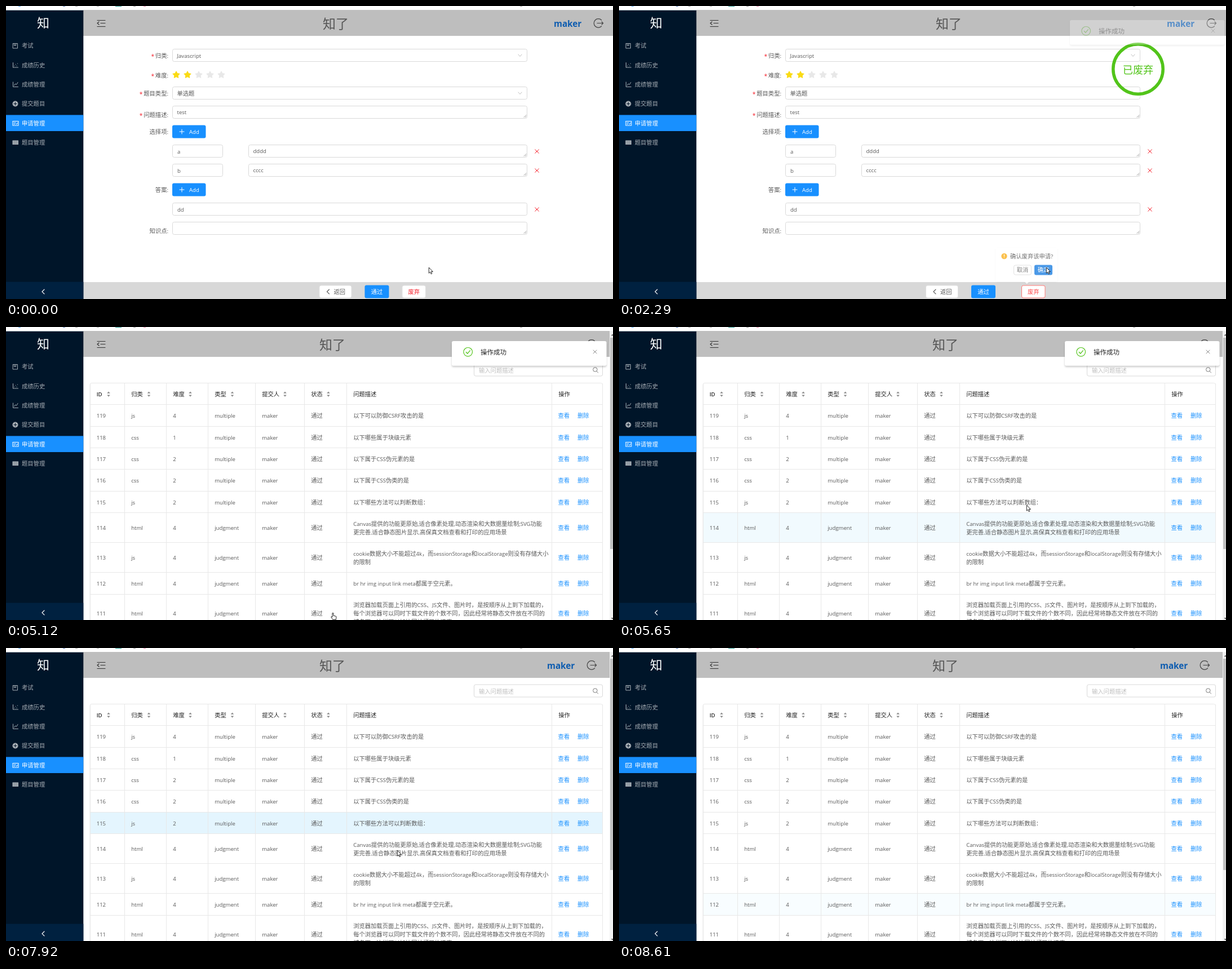
These frames come from a looping animation (1077 by 520 pixels, 9450 ms). An HTML page:

```html
<!DOCTYPE html>
<html lang="zh-CN">
<head>
<meta charset="utf-8">
<title>申请管理</title>
<style>
html, body { margin: 0; width: 100%; height: 100%; overflow: hidden; background: #fff; }
svg { display: block; width: 100%; height: 100%; }
text { font-family: "Open Sans", "Noto Sans CJK SC", "Noto Sans CJK", sans-serif; font-weight: 300; white-space: pre; }
.l { font-size: .93em; font-weight: 400; }
.strong .l { font-weight: 600; }
.line { fill: none; stroke-linecap: round; stroke-linejoin: round; }
</style>
</head>
<body>
<svg id="stage" viewBox="0 0 1077 520" xmlns="http://www.w3.org/2000/svg"></svg>
<script>
const BLUE = '#1890ff', RED = '#f5222d', GREEN = '#52c41a', INK = '#595959', EDGE = '#d9d9d9';
const LOOP = 9450;

// ---- drawing helpers ----
const latin = s => s.replace(/[\x20-\x7e]+/g, m => `<tspan class="l">${m}</tspan>`);
const text = (x, cy, s, fill = INK, size = 10.3, extra = '') =>
  `<text x="${x}" y="${cy + size * .36}" font-size="${size}" fill="${fill}" ${extra}>${latin(s)}</text>`;
const mid = 'text-anchor="middle"';
const rect = (x, y, w, h, fill, extra = '') =>
  `<rect x="${x}" y="${y}" width="${w}" height="${h}" fill="${fill}" ${extra}/>`;
const box = (x, y, w, h, stroke = EDGE, fill = '#fff', r = 3) =>
  rect(x + .5, y + .5, w - 1, h - 1, fill, `stroke="${stroke}" rx="${r}"`);
const line = (d, stroke, w = 1) => `<path class="line" d="${d}" stroke="${stroke}" stroke-width="${w}"/>`;
const circle = (x, y, r, fill, extra = '') => `<circle cx="${x}" cy="${y}" r="${r}" fill="${fill}" ${extra}/>`;
const group = (id, body) => `<g id="${id}">${body}</g>`;
const cross = (x, y, r, c) => line(`M${x - r} ${y - r}l${2 * r} ${2 * r}m0 ${-2 * r}l${-2 * r} ${2 * r}`, c);
const left = (x, y, c) => line(`M${x + 2} ${y - 4}l-4 4l4 4`, c, 1.1);

function star(x, y, c) {
  let pts = '';
  for (let i = 0; i < 10; i++) {
    const a = i * Math.PI / 5 - Math.PI / 2, r = i % 2 ? 3.2 : 6.2;
    pts += `${(x + r * Math.cos(a)).toFixed(2)},${(y + r * Math.sin(a)).toFixed(2)} `;
  }
  return `<polygon points="${pts}" fill="${c}" stroke="${c}" stroke-width="1.2" stroke-linejoin="round"/>`;
}

// ---- page frame ----
function sidebar() {
  const dim = '#a6adb4';
  const icons = [
    c => line('M12.5 66.5h8v8.5h-8zM14.5 66.5v4l1.5-1l1.5 1v-4', c),
    c => line('M12.5 100.5v8.5h9M15 106v.2M17 103.5v.2M19 106v.2M20.5 102v.2', c, 1.1),
    c => line('M12.5 135v8.5h9M14.5 141l2-3l2 1.5l2.5-4', c),
    c => circle(16.5, 173.5, 5, c) + line('M14 173.5h5M16.5 171v5', '#001529'),
    c => rect(12, 204.5, 10, 7.5, 'none', `stroke="${c}"`) + line('M14 207h3M14 209.5h2M18 209l1 1l2-3', c),
    c => rect(11.5, 238.5, 10.5, 7.5, c) + line('M13.5 240.5h7M13.5 242.3h7M13.5 244.2h7', '#68727c', .5)
  ];
  const names = ['考试', '成绩历史', '成绩管理', '提交题目', '申请管理', '题目管理'];
  return rect(0, 7.6, 137.3, 512.4, '#001529') + rect(0, 489.6, 137.3, 30.4, '#002140') +
    rect(0, 193.4, 137.3, 28.6, BLUE) + text(66, 30.5, '知', '#fff', 22, mid) + left(66, 507, '#fff') +
    names.map((n, i) => {
      const c = i === 4 ? '#fff' : dim;
      return icons[i](c) + text(28, 70.7 + i * 34.3, n, c);
    }).join('');
}

const strip = () => rect(0, 0, 1077, 7, '#fff') +
  [[24, BLUE], [103, '#2a5db0'], [125, '#888'], [163, '#999'], [228, '#777'], [246, '#e75a8c'], [914, '#888']]
    .map(([x, c]) => rect(x - 2, 0, 4, 1, c, 'opacity=".7"')).join('') + rect(194, 0, 11, 1, '#2aa198');

const header = () => rect(137, 7, 940, 46, '#bebebe') +
  line('M162 25.5h14M168 30.5h8M162 36.5h14M165 28l-3 2.5l3 2.5', '#333', 1.2) +
  group('title', text(585, 32, '知了', '#555', 23, mid)) +
  group('user', `<text x="972" y="37" font-size="15.2" fill="#0d5cb0" style="font-weight:700">maker</text>` +
    line('M1056.5 25a7.8 7.8 0 1 0 0 11M1049 30.5h10.5M1057 28l2.5 2.5l-2.5 2.5', '#444', 1.2));

// ---- form page ----
function form() {
  const label = (y, s, must) => {
    const w = s.length * 10.3 + 3;
    return text(288, y, s + ':', INK, 10.3, 'text-anchor="end"') +
      (must ? text(281 - w, y + 1, '*', RED, 11) : '');
  };
  const grip = y => line(`M919 ${y}l4-4M921.5 ${y}l1.5-1.5`, '#888', .8);
  const area = (x, y, s) => box(x, y, 925 - x, 23) + text(x + 8.5, y + 11, s) + grip(y + 20.5);
  const select = (y, s) => box(295, y, 630, 23) + text(303.5, y + 12, s) +
    line(`M909 ${y + 10}l3 3.5l3-3.5`, '#bfbfbf');
  const add = y => rect(295, y, 59.5, 23, BLUE, 'rx="3"') +
    line(`M308 ${y + 11.5}h8M312 ${y + 7.5}v8`, '#fff') + text(325, y + 12, 'Add', '#fff');
  const option = (y, k, v) => box(295, y, 90, 23) + text(304, y + 12, k) + area(430, y, v) + cross(942, y + 12, 3.3, RED);
  const back = (edge, ink) => box(555.5, 495.5, 58, 23, edge) + left(571.5, 507, ink) + text(581.5, 507, '返回', ink);
  const drop = (edge, ink, fill) => box(702.5, 495.5, 42.5, 23, edge, fill) + text(723.7, 507, '废弃', ink, 10.3, mid);
  return rect(137, 53, 940, 437, '#fff') + rect(137, 490, 940, 30, '#d8d8d8') +
    label(88, '归类', 1) + select(76, 'Javascript') +
    label(123, '难度', 1) + [0, 1, 2, 3, 4].map(i => star(302 + i * 20, 122.3, i < 2 ? '#fadb14' : '#e8e8e8')).join('') +
    label(155, '题目类型', 1) + select(143, '单选题') +
    label(193, '问题描述', 1) + area(295, 177, 'test') +
    label(223.5, '选择项') + add(211.5) +
    option(246, 'a', 'dddd') + option(280, 'b', 'cccc') +
    label(326, '答案') + add(314.5) +
    box(295, 349, 630, 23) + text(304, 361, 'dd') + cross(942, 361, 3.3, RED) +
    label(399, '知识点') + area(295, 383, '') +
    group('stamp', circle(921, 112, 44.2, 'none', `stroke="${GREEN}" stroke-width="5.5"`) +
      text(921, 113.5, '已废弃', GREEN, 18.2, mid)) +
    group('okBtns', group('back', back('#e0e0e0', INK)) + group('backOn', back('#40a9ff', '#40a9ff')) +
      rect(636.5, 495.5, 43, 23, BLUE, 'rx="3"') + text(658, 507, '通过', '#fff', 10.3, mid)) +
    group('dropBtn', group('drop', drop('#e0e0e0', RED)) + group('dropOn', drop('#ff7875', '#ff4d4f')) +
      group('dropOff', drop(EDGE, '#b8b8b8', '#f5f5f5'))) +
    group('pop', `<path d="M671 429h104q3 0 3 3v54q0 3-3 3h-47l-4.3 4.3l-4.3-4.3h-48.4q-3 0-3-3v-54q0-3 3-3z" fill="#fff" filter="url(#soft)"/>` +
      circle(683.5, 444, 5.2, '#faad14') + line('M683.5 441v3.5M683.5 446.6v.1', '#fff', 1.1) +
      text(694, 444, '确认废弃该申请?', '#444') +
      box(700, 459.5, 32, 18) + text(716, 468.7, '取消', INK, 10.3, mid) +
      rect(737, 459.5, 32, 18, '#1078e0', 'rx="3"') + text(753, 468.7, '确定', '#fff', 10.3, mid));
}

// ---- table page ----
const cols = [149, 210.5, 284.5, 358.5, 442.5, 529.5, 604.5, 968.5, 1058.5];
const edges = [137.5, 176.5, 214.5, 252.5, 291.5, 329.5, 382.5, 435.5, 474.5, 542.5];
const rows = [
  ['js', 4, '以下可以防御CSRF攻击的是'],
  ['css', 1, '以下哪些属于块级元素'],
  ['css', 2, '以下属于CSS伪元素的是'],
  ['css', 2, '以下属于CSS伪类的是'],
  ['js', 2, '以下哪些方法可以判断数组：'],
  ['html', 4, 'Canvas提供的功能更原始,适合像素处理,动态渲染和大数据量绘制;SVG功能|更完善,适合静态图片显示,高保真文档查看和打印的应用场景'],
  ['js', 4, 'cookie数据大小不能超过4k，而sessionStorage和localStorage则没有存储大小|的限制'],
  ['html', 4, 'br hr img input link meta都属于空元素。'],
  ['html', 4, '浏览器加载页面上引用的CSS、JS文件、图片时，是按顺序从上到下加载的，|每个浏览器可以同时下载文件的个数不同，因此经常将静态文件放在不同的|域名下，这样可以加快网站打开的速度']
];

function table() {
  const heads = ['ID', '归类', '难度', '类型', '提交人', '状态', '问题描述', '操作'];
  const sorts = [182, 253.5, 327, 401.5, 495, 572];
  const cell = (i, y, s, c, extra) => text(cols[i] + 11.7, y, String(s), c, 10.3, extra);
  let out = rect(137, 53, 940, 467, '#fff') + box(830, 64.5, 229, 23) + text(839, 77, '输入问题描述', '#bfbfbf') +
    circle(1045.3, 75.5, 3.7, 'none', 'stroke="#777"') + line('M1048 78.5l2.5 2.5', '#777') +
    rect(149, 99.5, 909.5, 450, '#fff', 'stroke="#e8e8e8" rx="3"');
  out += rows.map((r, i) => rect(149, edges[i], 909, edges[i + 1] - edges[i], '#e4f5fe', `id="row${i}" opacity="0"`)).join('');
  out += line(cols.slice(1, -1).map(x => `M${x} 99.5V520`).join('') + edges.map(y => `M149 ${y}H1058.5`).join('') +
    'M149.5 101V520M1058.5 101V520', '#e8e8e8');
  out += heads.map((h, i) => cell(i, 118.8, h, '#262626', 'class="strong"')).join('');
  out += sorts.map(x => `<path d="M${x - 2.8} 117.8l2.8-3.3l2.8 3.3zM${x - 2.8} 120.5l2.8 3.3l2.8-3.3z" fill="#8c8c8c"/>`).join('');
  rows.forEach(([kind, level, words], i) => {
    const y = i === 8 ? 508.5 : (edges[i] + edges[i + 1]) / 2 + .3;
    const type = i < 5 ? 'multiple' : 'judgment';
    [119 - i, kind, level, type, 'maker', '通过'].forEach((s, k) => { out += cell(k, y, s); });
    const parts = words.split('|');
    parts.forEach((s, k) => { out += cell(6, y + (k - (parts.length - 1) / 2) * 15, s); });
    out += text(979.5, y, '查看', BLUE) + text(1014, y, '删除', BLUE);
  });
  return out + rect(1071, 7, 6, 513, '#f1f1f1') + rect(1072, 19, 5, 375, '#c1c1c1') +
    '<path d="M1073.5 15.5l2.5-3l2.5 3zM1073.5 516l2.5 3l2.5-3z" fill="#666"/>';
}

const notice = () => rect(791, 25, 274.5, 43.5, '#fff', 'rx="3" filter="url(#shade)"') +
  circle(819.7, 44.3, 7.8, 'none', `stroke="${GREEN}" stroke-width="1.2"`) +
  line('M816.3 44.5l2.6 2.7l4.4-5.4', GREEN, 1.3) +
  text(842, 45, '操作成功', '#262626', 11.5) + cross(1045, 44, 3, '#8c8c8c');

const pointer = () =>
  group('arrow', '<path d="M.3 0v10.2l2.3-2.1l1.6 3.6l1.7-.8l-1.6-3.4h3.1z" fill="#fff" stroke="#111" stroke-width=".9" stroke-linejoin="round"/>') +
  group('hand', '<path d="M-1 1q1-1.5 2 0v4.3l4 .9q1.2.4 1 1.8l-.7 4.5h-5.3l-3-4.3q-.4-1.5 1-1.2l1 1z" fill="#fff" stroke="#111" stroke-width=".9" stroke-linejoin="round"/>');

const stage = document.getElementById('stage');
stage.innerHTML = `<defs>
  <filter id="soft" x="-20%" y="-20%" width="140%" height="150%"><feDropShadow dx="0" dy="1" stdDeviation="1.5" flood-opacity=".05"/></filter>
  <filter id="shade" x="-10%" y="-30%" width="120%" height="180%"><feDropShadow dx="0" dy="2.5" stdDeviation="1.5" flood-opacity=".2"/></filter>
</defs>` + rect(0, 0, 1077, 520, '#fff') + header() + group('form', form()) + group('table', table()) +
  sidebar() + strip() + group('notice', notice()) + group('cursor', pointer());

// ---- timing ----
const runs = [[0, 0, 1], [150, 540, 4], [810, 1610, 7], [2290, 3290, 8], [3420, 3840, 4], [5120, 5650, 5],
  [5800, 6160, 3], [6310, 7250, 8], [7400, 7920, 5], [8050, 8340, 3], [8490, 8610, 2]];
const ticks = runs.flatMap(([a, b, n]) => Array.from({ length: n }, (_, i) => n > 1 ? Math.round(a + (b - a) * i / (n - 1)) : a));
const snap = t => ticks.filter(k => k <= t).pop() || 0;

const path = [[0, 750, 464], [20, 750, 464], [540, 723, 505], [1000, 723, 505], [1610, 758, 464], [2300, 758, 464],
  [3290, 612, 510], [3840, 580, 507], [5250, 580, 507], [5517, 700, 350], [5650, 723, 316], [6310, 711, 297],
  [6900, 613, 303], [7250, 660, 306], [7790, 692, 324], [7920, 694, 359], [8340, 690, 472], [8490, 688, 560], [LOOP, 688, 560]];

function place(t) {
  const i = Math.max(1, path.findIndex(p => p[0] >= t));
  const [t0, x0, y0] = path[i - 1], [t1, x1, y1] = path[i];
  const f = (t - t0) / (t1 - t0);
  return [x0 + (x1 - x0) * f, y0 + (y1 - y0) * f];
}

// Share of the last 200 ms the pointer spent over a row, eased.
function glow(i, t) {
  let n = 0;
  for (let s = 5; s < 200; s += 10) {
    if (t - s < 5500) break;
    const y = place(snap(t - s))[1];
    if (y >= edges[i] && y < edges[i + 1]) n++;
  }
  return (n / 20) ** 1.5;
}

const el = id => document.getElementById(id);
const fade = (id, o) => {
  el(id).setAttribute('opacity', o);
  el(id).style.display = +o ? '' : 'none';
};
const move = (id, x, y = 0) => el(id).setAttribute('transform', `translate(${x} ${y})`);
const within = (t, a, b) => t >= a && t < b;

let last = -1;
function show(t) {
  const q = snap(t), list = q >= 5120;
  if (q === last) return;
  last = q;
  fade('form', list ? 0 : 1);
  fade('table', list ? 1 : 0);
  move('title', list ? -6 : 0);
  move('user', list ? -12 : 0);

  const shift = q >= 810 ? 11.5 : 0;
  move('okBtns', -shift);
  move('dropBtn', shift);
  fade('backOn', q >= 3690 ? 1 : 0);
  fade('dropOn', within(q, 540, 2400) ? 1 : 0);
  fade('dropOff', q >= 2400 ? 1 : 0);
  fade('stamp', q >= 2290 ? 1 : 0);

  const open = within(q, 810, 2290) ? Math.min(1, (q - 700) / 200) : within(q, 2290, 2400) ? .75 : 0;
  const k = q < 2290 ? .8 + .2 * open : 1;
  fade('pop', open);
  el('pop').setAttribute('transform', `translate(723.7 493) scale(${k}) translate(-723.7 -493)`);

  fade('notice', within(q, 2290, 2400) ? .3 : within(q, 2400, 6840) ? 1 : within(q, 6840, 6950) ? .4 : 0);
  move('notice', within(q, 2290, 2400) ? 9 : 0);

  const hand = within(q, 410, 1000) || within(q, 1470, 2290) || within(q, 3560, 5200);
  fade('hand', hand ? 1 : 0);
  fade('arrow', hand ? 0 : 1);
  move('cursor', ...place(q));
  rows.forEach((_, i) => el('row' + i).setAttribute('opacity', glow(i, q).toFixed(3)));
}

const start = performance.now();
function tick() {
  show((performance.now() - start) % LOOP);
  requestAnimationFrame(tick);
}
tick();
</script>
</body>
</html>
```
